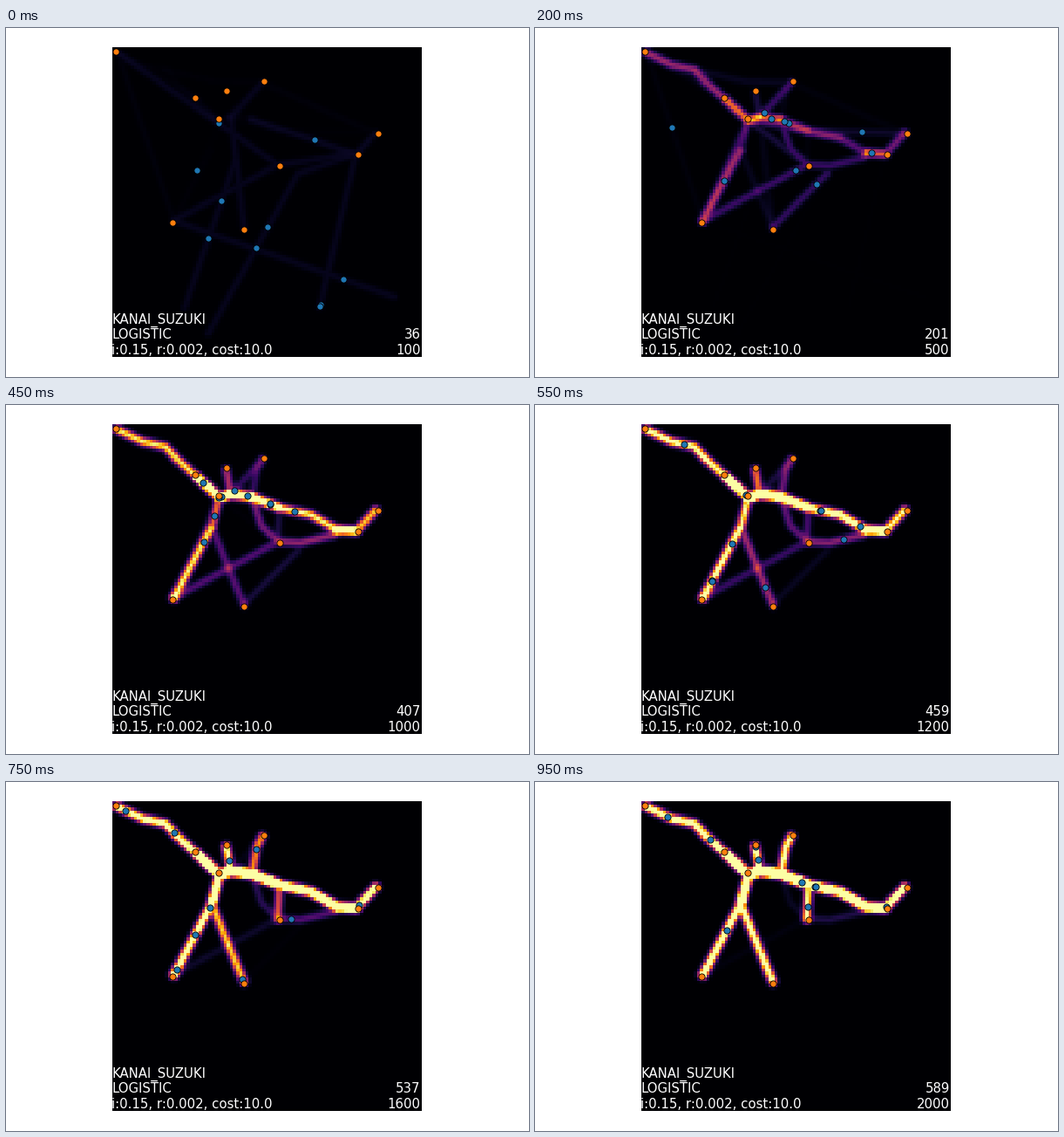
Recreate the animation shown at these times as a matplotlib script. Size 600 by 400 pixels, loop 1000 ms.

```python
import numpy as np
import matplotlib.pyplot as plt
from matplotlib.animation import FuncAnimation

WIDTH, HEIGHT, DPI = 600, 400, 100
LEFT, TOP, SIZE, CELLS = 122, 22, 355, 100
FRAMES, INTERVAL, STEPS_PER_FRAME = 20, 50, 100
AGENTS = 10
SIGMA = 0.95 * SIZE / CELLS

CITIES = dict(
    A=(126, 26.8), B=(217.2, 80.2), C=(252.8, 71.8), D=(295.5, 60.7),
    E=(244, 103.7), F=(426.6, 120.7), G=(404, 144.8), H=(313.8, 158),
    I=(191.3, 223.2), J=(273.1, 231))
JUNCTIONS = dict(
    a=(157, 42), K=(183, 48), k=(197, 63), M=(258, 102), d=(288, 74),
    N=(282, 105), P=(314, 118), Q=(350, 126), R=(380, 143), L=(236, 140),
    S=(376, 149), h=(338, 158), n=(293, 138), e=(240, 61), j=(335, 167),
    z=(264, 150), v=(445, 308), w=(360, 320), x=(232, 350), y=(205, 320))

# Strands are spelled with node letters, each group in order of time.
TRUNKS = "AaKkB BE LI RG GF EM MN NP PQR CM EL LJ DdN HP".split()
SHORTCUTS = "AI DF AB MJ KeD PF EH EQ EI Jj DM IH NnH HhSR".split()
STRAYS = "AH NG GF IH HG DMz zJ zy Iv Gw Gjx".split()
PATHS = TRUNKS + SHORTCUTS + STRAYS


def inward(point, pull=2.5):
    """Strands end a little short of their city, towards the middle."""
    d = np.array([250, 120]) - point
    return point + pull * d / np.hypot(*d)


NODES = {**{c: inward(p) for c, p in CITIES.items()}, **JUNCTIONS}


def traffic(trunk):
    """City pairs whose route over the tree of trunks uses this one."""
    reached = {trunk[0]}
    for _ in TRUNKS:
        for other in TRUNKS:
            ends = {other[0], other[-1]}
            if other != trunk and reached & ends:
                reached |= ends
    n = len(reached & set(CITIES))
    return n * (len(CITIES) - n)


TRUNK_GAIN = 0.15 * np.array([traffic(p) for p in TRUNKS])
TRUNK_MID = 7.5 + 0.055 * np.arange(len(TRUNKS)) ** 2
SHORTCUT_PEAK = 2.5 + 0.045 * np.arange(len(SHORTCUTS)) ** 2
SHORTCUT_GAIN = 0.05 + 0.0034 * SHORTCUT_PEAK**2


def pulse(x):
    return x * np.exp(1 - x)


def strengths(t):
    """Strength of every strand, t in hundreds of steps."""
    onset = 1 - np.exp(-(t / 2.2) ** 3)
    trunks = onset * TRUNK_GAIN / (1 + np.exp((TRUNK_MID - t) / 2.8))
    shortcuts = SHORTCUT_GAIN * pulse(t / SHORTCUT_PEAK) ** 4
    strays = np.full(len(STRAYS), 0.05 * pulse(t))
    return np.concatenate([trunks, shortcuts, strays])


centres = (np.arange(CELLS) + 0.5) * SIZE / CELLS
GRID = np.stack(np.meshgrid(LEFT + centres, TOP + centres), axis=-1)
LINES = [np.array([NODES[c] for c in path]) for path in PATHS]
LENGTHS = np.array([np.hypot(*np.diff(p, axis=0).T).sum() for p in LINES])


def ridge(points):
    """Gaussian profile along a polyline."""
    nearest = np.full((CELLS, CELLS), np.inf)
    for p, q in zip(points, points[1:]):
        d = q - p
        s = np.clip((GRID - p) @ d / (d @ d), 0, 1)
        gap = GRID - p - s[..., None] * d
        nearest = np.minimum(nearest, (gap**2).sum(axis=-1))
    return np.exp(-nearest / (2 * SIGMA**2))


RIDGES = np.array([ridge(points) for points in LINES])


def field(t):
    layers = strengths(t)[:, None, None] * RIDGES
    split = len(TRUNKS)
    return layers[:split].max(axis=0) + layers[split:].max(axis=0)


def along(points, share):
    marks = np.append(0, np.cumsum(np.hypot(*np.diff(points, axis=0).T)))
    return [np.interp(share * marks[-1], marks, points[:, k]) for k in (0, 1)]


def agent_spots(step):
    """Agents are likelier on long and strong strands."""
    rng = np.random.default_rng(step)
    weights = LENGTHS * np.minimum(strengths(step / 100), 1)
    picks = rng.choice(len(LINES), AGENTS, p=weights / weights.sum())
    return [along(LINES[i], rng.random()) for i in picks]


COUNT_STEPS = np.array([100, 300, 500, 800, 1200, 1600, 2000])
COUNTS = np.array([36, 113, 201, 340, 459, 537, 589])
SLOPES = np.gradient(COUNTS, COUNT_STEPS)


def count_at(step):
    """Cubic Hermite curve through a few counter values."""
    i = min(np.searchsorted(COUNT_STEPS, step, side="right") - 1,
            len(COUNTS) - 2)
    span = COUNT_STEPS[i + 1] - COUNT_STEPS[i]
    s = (step - COUNT_STEPS[i]) / span
    blend = s * s * (3 - 2 * s)
    value = (COUNTS[i] + blend * (COUNTS[i + 1] - COUNTS[i])
             + span * s * (1 - s) * ((1 - s) * SLOPES[i] - s * SLOPES[i + 1]))
    return round(float(value))


fig = plt.figure(figsize=(WIDTH / DPI, HEIGHT / DPI), dpi=DPI, facecolor="white")
ax = fig.add_axes([LEFT / WIDTH, 1 - (TOP + SIZE) / HEIGHT,
                   SIZE / WIDTH, SIZE / HEIGHT])
ax.axis("off")
heat = ax.imshow(np.zeros((CELLS, CELLS)), cmap="inferno", vmin=0, vmax=1,
                 interpolation="nearest", aspect="auto",
                 extent=(LEFT, LEFT + SIZE, TOP + SIZE, TOP))
ax.set_autoscale_on(False)

dot = dict(s=27, edgecolors="black", linewidths=0.6, clip_on=False)
agents = ax.scatter([], [], color="#1f77b4", zorder=3, **dot)
ax.scatter(*zip(*CITIES.values()), color="#ff7f0e", zorder=4, **dot)


def label(x, line, text, align):
    return ax.text(x, 338.4 + 17.75 * line, text, color="white", ha=align,
                   va="baseline", fontsize=10.7, family="DejaVu Sans", zorder=5)


for line, text in enumerate(
        ["KANAI_SUZUKI", "LOGISTIC", "i:0.15, r:0.002, cost:10.0"]):
    label(121.2, line, text, "left")
count_text = label(475.6, 1, "", "right")
step_text = label(475.6, 2, "", "right")


def update(frame):
    step = STEPS_PER_FRAME * (frame + 1)
    heat.set_data(field(step / 100))
    agents.set_offsets(agent_spots(step))
    count_text.set_text(str(count_at(step)))
    step_text.set_text(str(step))
    return heat, agents, count_text, step_text


anim = FuncAnimation(fig, update, frames=FRAMES, interval=INTERVAL, repeat=True)
plt.show()
```
